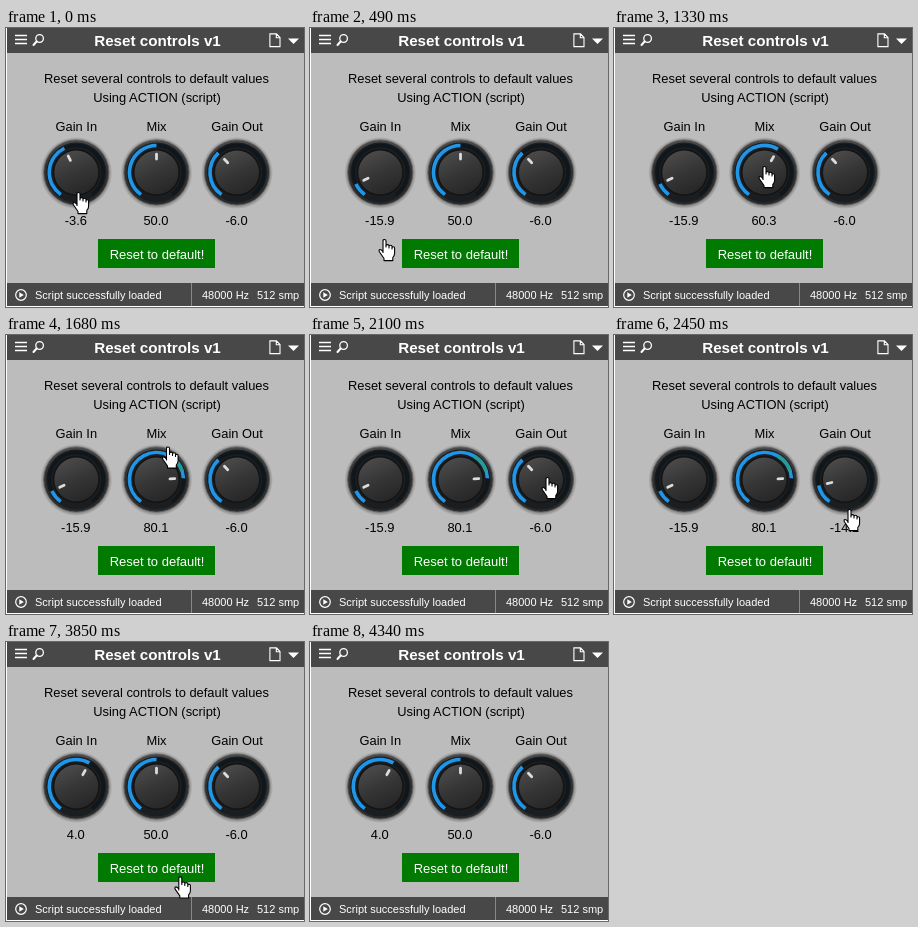
Animation, 298 px wide and 279 px high, one loop 4410 ms. Source, as an HTML page:

```html
<!DOCTYPE html>
<html lang="en">
<head>
<meta charset="utf-8">
<title>Reset controls</title>
<style>
html, body { margin: 0; width: 100%; height: 100%; overflow: hidden; background: #fff; }
svg { display: block; width: 298px; height: 279px; }
text { font: 12.9px "Liberation Sans", Arial, sans-serif; fill: #000; }
.mid { text-anchor: middle; }
.title { font-size: 15.2px; font-weight: bold; fill: #fff; }
.button { font-size: 13px; fill: #fff; }
.foot { font-size: 11px; fill: #fff; }
.line { fill: none; stroke: #fff; stroke-width: 1.3; }
</style>
</head>
<body>
<svg viewBox="0 0 298 279">
  <defs>
    <linearGradient id="rim" x1="0" y1="0" x2="0" y2="1">
      <stop offset="0" stop-color="#4a4a4a"/><stop offset=".4" stop-color="#333"/>
      <stop offset="1" stop-color="#2a2a2a"/>
    </linearGradient>
    <linearGradient id="cap" x1=".25" y1="0" x2=".7" y2="1">
      <stop offset="0" stop-color="#4c4c4c"/><stop offset=".5" stop-color="#363636"/>
      <stop offset="1" stop-color="#262626"/>
    </linearGradient>
    <radialGradient id="shade">
      <stop offset=".88" stop-color="#000" stop-opacity=".35"/>
      <stop offset="1" stop-color="#000" stop-opacity="0"/>
    </radialGradient>
  </defs>
  <rect width="298" height="279" fill="#fff"/>
  <rect x="1" width="297" height="278" fill="#bcbcbc"/>
  <rect x="1" width="297" height="25" fill="#484848"/>
  <path class="line" d="M9 7.5H21M9 11.5H21M9 15.5H21"/>
  <circle class="line" cx="33.6" cy="10.5" r="3.8"/>
  <path class="line" stroke-linecap="round" d="M30.6 13.5L27.5 17" style="stroke-width:2"/>
  <path class="line" d="M263.9 5.9H270.5L274 9.5V18.6H263.9ZM270.3 5.9V9.7H274" style="stroke-width:1.1"/>
  <path d="M282 10.5H293L287.5 16Z" fill="#fff"/>
  <text class="title mid" x="151.5" y="17.5">Reset controls v1</text>

  <text class="mid" x="150.5" y="55">Reset several controls to default values</text>
  <text class="mid" x="151" y="74">Using ACTION (script)</text>
  <g id="knobs"></g>
  <rect x="92" y="211" width="117" height="29" fill="#007a00"/>
  <text class="button mid" x="151" y="231">Reset to default!</text>

  <rect x="1" y="255" width="297" height="23" fill="#484848"/>
  <path d="M185.5 255V278" stroke="#888"/>
  <circle class="line" cx="15" cy="267" r="5.3" style="stroke-width:1.2"/>
  <path d="M13.3 264.2L17.8 267L13.3 269.8Z" fill="#fff"/>
  <text class="foot" x="29" y="271">Script successfully loaded</text>
  <text class="foot" x="196" y="271">48000 Hz</text>
  <text class="foot" x="251" y="271">512 smp</text>

  <path id="hand" fill="#fff" stroke="#000" stroke-width="1.1" stroke-linejoin="round"
    d="M-2 14V1.7Q-2 .5 -.5 .5T1 1.7V8V6.8Q1 5.6 2.5 5.6T4 6.8V9V7.4Q4 6.2 5.5 6.2T7 7.4V10V8.8
       Q7 7.8 8.3 7.8T9.6 9V14.5Q9.6 16.5 7.8 18.5V21.6H-1V19.5L-5.5 13Q-6.5 11 -5.2 10.5Q-4 10.2 -2 12.6"/>
</svg>
<script>
const LOOP = 4410, STEP = 70, SWEEP = 290, PIXELS = 154, RESET_AT = 3220;
const BLUE = "#2196e8", TEAL = "#259a9a", RADIUS = 27;

// grab/release bound the drag; y0 is the pointer height where it was grabbed
const knobs = [
  { name: "Gain In", x: 70.3, min: -20, max: 20, rest: 4, y0: 134.75, grab: 0, release: 490, end: -15.9 },
  { name: "Mix", x: 150.5, min: 0, max: 100, rest: 50, y0: 153.86, grab: 1260, release: 1540, end: 80.1 },
  { name: "Gain Out", x: 231, min: -20, max: 20, rest: -6, y0: 142.5, grab: 2240, release: 2520, end: -16.7 }
];

// pointer tip: time, x, y
const path = [
  [0, 73, 164], [490, 75, 211], [630, 75, 211], [1120, 149, 154], [1190, 149, 154],
  [1330, 151, 138], [1540, 154, 109], [1610, 157, 110], [1750, 168, 113],
  [2100, 238, 142], [2240, 237, 142], [2310, 237, 150], [2450, 236, 174], [2520, 235, 183.5],
  [2870, 159, 229], [3010, 158, 222], [3780, 158, 222], [4130, 242, 284]
];

function add(parent, tag, attrs) {
  const el = document.createElementNS("http://www.w3.org/2000/svg", tag);
  for (const key in attrs) el.setAttribute(key, attrs[key]);
  return parent.appendChild(el);
}

function point(angle, r) {
  const a = angle * Math.PI / 180;
  return (Math.sin(a) * r).toFixed(2) + " " + (-Math.cos(a) * r).toFixed(2);
}

function arc(from, to) {
  if (to <= from) return "";
  return `M${point(from, RADIUS)}A${RADIUS} ${RADIUS} 0 ${to - from > 180 ? 1 : 0} 1 ${point(to, RADIUS)}`;
}

function build(knob) {
  const root = document.getElementById("knobs");
  add(root, "text", { class: "mid", x: knob.x, y: 103 }).textContent = knob.name;
  const g = add(root, "g", { transform: `translate(${knob.x} 144.5)` });
  add(g, "circle", { r: 36, cy: .5, fill: "url(#shade)" });
  add(g, "circle", { r: 32.6, fill: "url(#rim)", stroke: "#666", "stroke-width": .8 });
  add(g, "circle", { r: 30, fill: "#1b1e20" });
  const stroke = { fill: "none", "stroke-width": 3.6 };
  add(g, "path", { ...stroke, d: arc(-145, 145), stroke: "#10171c" });
  knob.arc = add(g, "path", { ...stroke, stroke: BLUE });
  knob.tail = add(g, "path", { ...stroke, stroke: TEAL });
  add(g, "circle", { r: 23.5, fill: "#131313" });
  add(g, "circle", { r: 22, fill: "url(#cap)" });
  knob.mark = add(g, "path", { d: "M0 -18.3V-13.5", stroke: "#dcdcdc", "stroke-width": 2.8, "stroke-linecap": "round" });
  knob.text = add(root, "text", { class: "mid", x: knob.x - .5, y: 197 });
}

function pointer(t) {
  const i = path.findIndex(p => p[0] > t);
  if (i < 0) return path[path.length - 1].slice(1);
  const [t0, x0, y0] = path[i - 1], [t1, x1, y1] = path[i];
  const k = (t - t0) / (t1 - t0);
  return [x0 + (x1 - x0) * k, y0 + (y1 - y0) * k];
}

function valueAt(knob, t, y) {
  if (t < knob.grab || t >= RESET_AT) return knob.rest;
  if (t >= knob.release) return knob.end;
  return knob.rest + (knob.y0 - y) * (knob.max - knob.min) / PIXELS;
}

function render(time) {
  const t = Math.floor((time % LOOP) / STEP) * STEP;
  const [x, y] = pointer(t);
  const hand = document.getElementById("hand");
  hand.setAttribute("transform", `translate(${x.toFixed(1)} ${y.toFixed(1)})`);
  hand.style.display = t < 4130 ? "" : "none";
  for (const knob of knobs) {
    const value = valueAt(knob, t, y);
    const angle = ((value - knob.min) / (knob.max - knob.min) - .5) * SWEEP;
    knob.arc.setAttribute("d", arc(-145, angle));
    knob.tail.setAttribute("d", arc(30, Math.min(angle, 72)));
    knob.mark.setAttribute("transform", `rotate(${angle.toFixed(2)})`);
    knob.text.textContent = value.toFixed(1);
  }
}

knobs.forEach(build);
const start = performance.now();
function tick() {
  render(performance.now() - start);
  requestAnimationFrame(tick);
}
tick();
</script>
</body>
</html>
```
